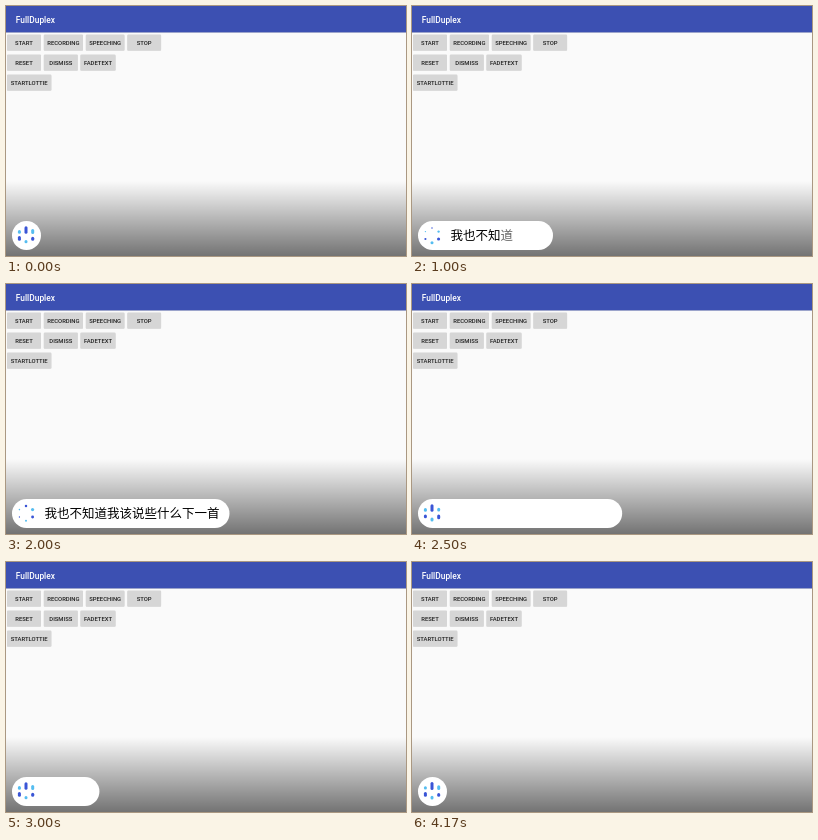
Recreate the animation shown at these times as an HTML page. Size 400x250 px, loop 4.34 s.

```html
<!DOCTYPE html>
<html lang="zh-CN">
<head>
<meta charset="utf-8">
<title>FullDuplex</title>
<style>
  html, body { margin: 0; width: 100%; height: 100%; overflow: hidden; background: #fafafa; }
  svg { display: block; width: 400px; height: 250px; }
  text { font-family: Roboto, sans-serif; font-weight: 500; }
  .label { font-size: 5.9px; fill: #202020; text-anchor: middle; }
  .title { font-size: 8.4px; fill: #fff; }
  .speech text { font: 400 12.5px "Noto Sans CJK SC", "Noto Sans CJK", sans-serif; fill: #000; }
</style>
</head>
<body>
<svg viewBox="0 0 400 250">
  <defs>
    <linearGradient id="shade" x1="0" y1="0" x2="0" y2="1">
      <stop offset="0" stop-color="#000" stop-opacity="0"/>
      <stop offset="1" stop-color="#000" stop-opacity=".54"/>
    </linearGradient>
  </defs>
  <rect width="400" height="250" fill="#fafafa"/>
  <rect width="400" height="27" fill="#000" opacity=".12"/>
  <rect width="400" height="26.4" fill="#3c50b2"/>
  <text class="title" x="9.8" y="16.7">FullDuplex</text>
  <g id="buttons"></g>
  <circle id="touch" cx="103.5" cy="36" r="4.2" fill="#d8d8d8" opacity="0"/>
  <rect y="175" width="400" height="75" fill="url(#shade)"/>
  <rect id="pill" x="6" y="215" width="29" height="29" rx="14.5" fill="#fff"/>
  <g id="icon"></g>
  <g id="speech" class="speech"></g>
</svg>
<script>
const LOOP = 4340, FPS = 6, LAST = 25;
const OPEN = 546, CLOSE = 2443, SPEED = 0.2335;
const MIN_W = 29, MAX_W = 217.5;
const DARK = '#3a55d6', LIGHT = '#55bdf0';
const PHRASE = '我也不知道我该说些什么下一首';
const FADE_AT = 654, FADE = 75;

const $ = id => document.getElementById(id);
const clamp = (v, lo, hi) => Math.min(hi, Math.max(lo, v));

function set(el, attrs) {
  for (const key in attrs) el.setAttribute(key, attrs[key]);
  return el;
}
function add(parent, tag, attrs, text = '') {
  const el = set(document.createElementNS('http://www.w3.org/2000/svg', tag), attrs);
  el.textContent = text;
  return parent.appendChild(el);
}

const buttons = {};
[
  ['START', 1, 28.6, 34], ['RECORDING', 37.8, 28.6, 39.2],
  ['SPEECHING', 79.8, 28.6, 38.7], ['STOP', 121.3, 28.6, 33.8],
  ['RESET', 1, 48.6, 34], ['DISMISS', 37.8, 48.6, 34], ['FADETEXT', 74.4, 48.6, 35.2],
  ['STARTLOTTIE', 1, 68.6, 44.4]
].forEach(([name, x, y, width]) => {
  const box = { x, width, height: 15.9, rx: 0.8 };
  add($('buttons'), 'rect', { ...box, y: y + 0.6, fill: '#000', opacity: 0.1 });
  buttons[name] = add($('buttons'), 'rect', { ...box, y, fill: '#d6d6d6' });
  add($('buttons'), 'text', { class: 'label', x: x + width / 2, y: y + 10.1 }, name);
});

const glyphs = [...PHRASE].map((ch, i) =>
  add($('speech'), 'text', { x: 38.4 + i * 12.5, y: 234.3 }, ch));

// Bars: x, y, height; listed clockwise from the top.
const bars = [
  [20, 224, 7.6], [26.7, 225.6, 4.4], [26.7, 232.8, 4.4],
  [20, 235.6, 3.6], [13.4, 232.4, 4.2], [13.4, 225.8, 3.8]
];
const dots = bars.map((_, i) => add($('icon'), 'rect', { fill: i % 2 ? LIGHT : DARK }));

function placeDot(el, x, y, w, h) {
  set(el, { x: x - w / 2, y: y - h / 2, width: w, height: h, rx: w / 2 });
}

function drawIcon(t, spinning) {
  const peak = 150 + (t - 1330) * 0.29;
  dots.forEach((el, i) => {
    if (spinning) {
      const deg = i * 60 - 90, a = deg * Math.PI / 180;
      const near = 0.5 + 0.5 * Math.cos((deg - peak) * Math.PI / 180);
      const size = 1.3 + 1.9 * near;
      placeDot(el, 20 + 7.6 * Math.cos(a), 229.3 + 7.4 * Math.sin(a), size, size);
    } else {
      const [x, y, h] = bars[i];
      placeDot(el, x, y, 3, h + 0.6 * Math.sin(t / 160 + i * 1.9));
    }
  });
}

function draw(t) {
  const open = t < CLOSE;
  const width = open ? MIN_W + (t - OPEN) * SPEED : MAX_W - (t - CLOSE) * SPEED;
  set($('pill'), { width: clamp(width, MIN_W, MAX_W) });

  glyphs.forEach((el, i) => {
    const alpha = open ? clamp((t - FADE_AT - i * FADE) / FADE, 0, 1) : 0;
    set(el, { opacity: alpha });
  });

  const pressed = t >= 495 && t < 825;
  set(buttons.SPEECHING, { fill: pressed ? '#b4b4b4' : '#d6d6d6' });
  set($('touch'), { opacity: pressed ? 0.75 : 0 });

  drawIcon(t, t > 825 && open);
}

function tick(now) {
  const step = Math.min(LAST, Math.floor((now % LOOP) * FPS / 1000 + 0.021));
  draw(step * 1000 / FPS);
  requestAnimationFrame(tick);
}
tick(performance.now());
</script>
</body>
</html>
```
